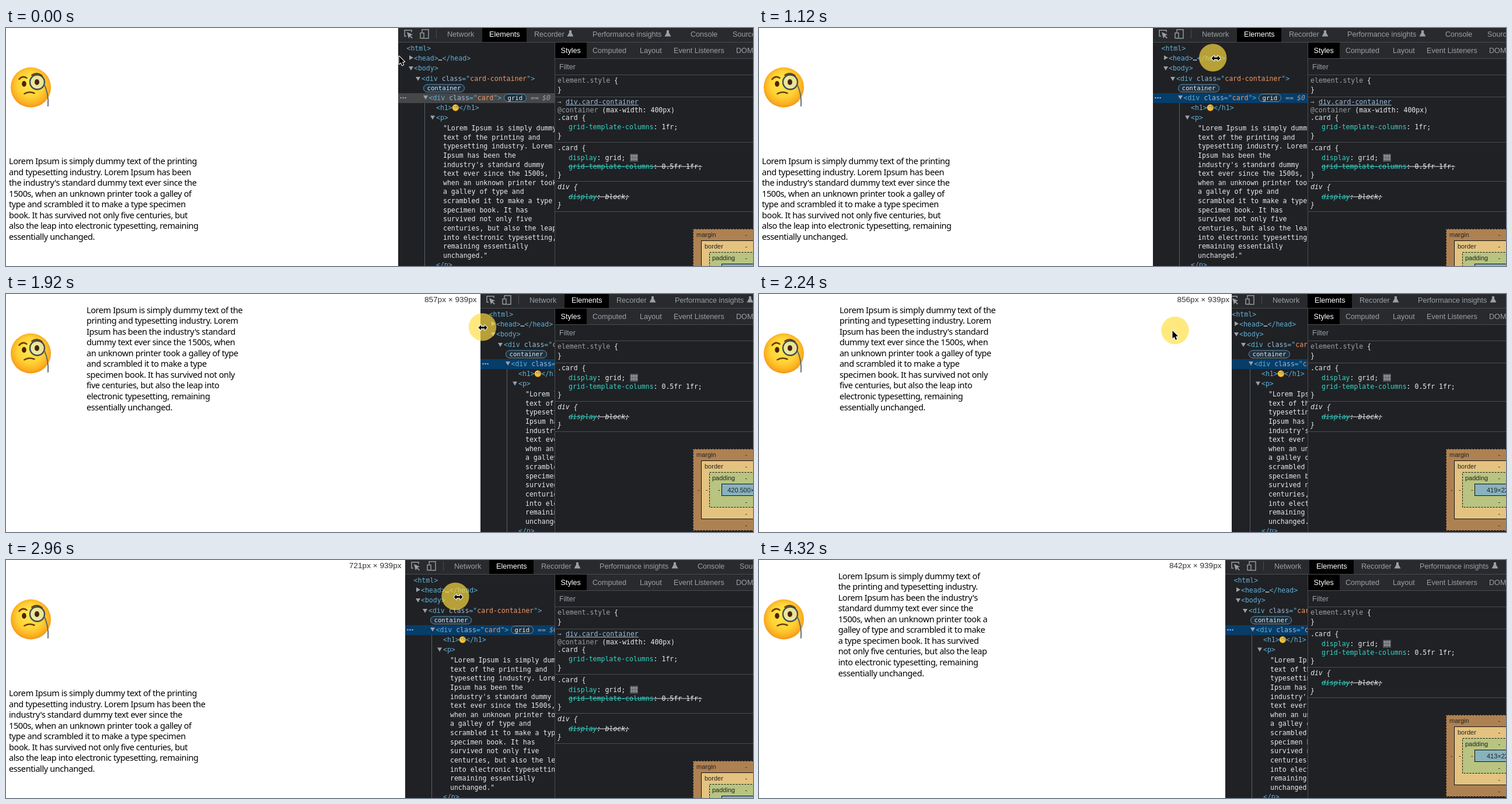
Recreate the animation shown at these times as an HTML page with a canvas. Size 1280 px wide and 409 px high, loop 4.48 s.

```html
<!DOCTYPE html>
<html lang="en">
<head>
<meta charset="utf-8">
<title>Container query demo</title>
<style>
  html, body { margin: 0; width: 100%; height: 100%; overflow: hidden; background: #fff; }
  canvas { display: block; width: 1280px; height: 409px; }
</style>
</head>
<body>
<canvas id="stage" width="1280" height="409"></canvas>
<script>
const ctx = document.getElementById('stage').getContext('2d');
const LOOP = 4480, STEP = 80, ZOOM = 0.949, SPLIT = 940, BREAK = 774;

const SANS = '"Liberation Sans", Arial, sans-serif';
const UI = '12.6px ' + SANS;
const CODE = '11.52px "DejaVu Sans Mono", monospace';
const SLANT = 'italic ' + CODE;
const BADGE = '10.7px "DejaVu Sans Mono", monospace';
const PAGE = '14.5px "Noto Sans", sans-serif';

const C = {
  bg: '#202124', bar: '#292a2d', line: '#494c50', gray: '#9aa0a6', light: '#e8eaed',
  tag: '#5db0d7', attr: '#9bbbdc', value: '#f29766', prop: '#35d4c7'
};

const words = ('Lorem Ipsum is simply dummy text of the printing and typesetting industry. ' +
  "Lorem Ipsum has been the industry's standard dummy text ever since the 1500s, when an " +
  'unknown printer took a galley of type and scrambled it to make a type specimen book. ' +
  'It has survived not only five centuries, but also the leap into electronic typesetting, ' +
  'remaining essentially unchanged.').split(' ');

// Words per line, by the smallest page width at which the wrapping applies.
const wraps = [
  [806, [8, 5, 6, 7, 8, 7, 7, 7, 3, 2]],
  [BREAK, [7, 5, 6, 6, 7, 8, 7, 8, 4, 2]],
  [714, [10, 7, 8, 10, 10, 9, 5, 1]],
  [680, [9, 8, 7, 9, 9, 9, 7, 2]],
  [0, [9, 7, 8, 9, 9, 9, 7, 2]]
];
const treeWrap = [5, 5, 3, 4, 3, 5, 5, 5, 6, 4, 4, 5, 3, 2, 1];

// Page width and pointer position as [time, value] keys.
const pageKeys = [[0, 672], [1040, 672], [1120, 675], [1200, 695], [1280, 730], [1360, 762],
  [1440, 782], [1520, 794], [1600, 802], [1760, 811], [2000, 814], [2160, 813.5], [2240, 812.5],
  [2320, 790], [2400, 745], [2480, 705], [2560, 681], [2880, 681], [2960, 684], [3040, 705],
  [3120, 735], [3200, 762], [3280, 779], [3360, 786.7], [3440, 789], [3840, 789], [4320, 799]];
const mouseX = [[0, 673], [160, 674], [240, 675], [880, 675], [960, 690], [1040, 735], [1120, 783],
  [1200, 806], [1280, 814], [1600, 817], [1920, 817], [2000, 814], [2080, 800], [2160, 762],
  [2240, 708], [2320, 690], [2400, 685], [2560, 684], [2720, 684], [2800, 690], [2880, 730],
  [2960, 775], [3040, 795], [3120, 801], [3360, 802]];
const mouseY = [[0, 48], [80, 48], [160, 53], [240, 51], [1680, 51], [2160, 62.5]];

function at(keys, t) {
  let i = 1;
  while (i < keys.length && keys[i][0] <= t) i++;
  const [t0, a] = keys[i - 1];
  if (i === keys.length) return a;
  const [t1, b] = keys[i];
  return a + (b - a) * (t - t0) / (t1 - t0);
}

function lines(counts) {
  let i = 0;
  return counts.map(n => words.slice(i, i += n).join(' '));
}

function rect(x, y, w, h, color) {
  ctx.fillStyle = color;
  ctx.fillRect(x, y, w, h);
}

function text(s, x, y, color, font) {
  ctx.font = font;
  ctx.fillStyle = color;
  ctx.fillText(s, x, y);
  return x + ctx.measureText(s).width;
}

// Draws coloured pieces [string, colour, ...] one after another.
function run(x, yc, parts, font = CODE, strike = false) {
  for (let i = 0; i < parts.length; i += 2) {
    const end = text(parts[i], x, yc + 4, parts[i + 1], font);
    if (strike) rect(x, yc, end - x, 1, parts[i + 1]);
    x = end;
  }
  return x;
}

function shape(points, fill) {
  ctx.beginPath();
  points.forEach(([x, y]) => ctx.lineTo(x, y));
  ctx.closePath();
  if (fill) {
    ctx.fillStyle = fill;
    ctx.fill();
  }
}

function curve(color, width, x0, y0, ...rest) {
  ctx.strokeStyle = color;
  ctx.lineWidth = width;
  ctx.beginPath();
  ctx.moveTo(x0, y0);
  ctx.quadraticCurveTo(...rest);
  ctx.stroke();
}

function ellipse(x, y, rx, ry, color) {
  ctx.fillStyle = color;
  ctx.beginPath();
  ctx.ellipse(x, y, rx, ry, 0, 0, 7);
  ctx.fill();
}

function face(x, y, r) {
  ctx.save();
  ctx.translate(x, y);
  ctx.scale(r / 34.5, r / 34.5);
  ctx.lineCap = 'round';
  const g = ctx.createRadialGradient(-2, -10, 4, 0, -2, 37);
  g.addColorStop(0, '#ffe650');
  g.addColorStop(0.55, '#ffd235');
  g.addColorStop(0.85, '#fbb021');
  g.addColorStop(1, '#f2921b');
  ellipse(0, 0, 34.5, 34.5, g);
  curve('#6b3c0c', 2.6, -20, -14, -14, -21, -7, -16);
  curve('#6b3c0c', 2.6, 2, -21, 10, -27, 19, -20);
  ellipse(-11.5, -6, 3.8, 5, '#4b2508');
  ellipse(11, -9, 12.5, 12.5, 'rgba(226,233,190,.72)');
  ellipse(10.5, -9, 4, 5, '#4b2508');
  ctx.strokeStyle = '#3f4a52';
  ctx.lineWidth = 2.4;
  ctx.beginPath();
  ctx.arc(11, -9, 12.5, 0, 7);
  ctx.stroke();
  curve('#59636b', 1.8, 23, -5, 31, 12, 29.5, 32);
  curve('#6b3c0c', 2.6, -11, 11, -3, 6, 6, 10);
  ctx.restore();
}

function drawPage(width, showSize) {
  const stacked = width < BREAK;
  const counts = wraps.find(w => width >= w[0])[1];
  const x = stacked ? 5 : 5 + (width - 15.2) / 6;
  const y = stacked ? 234 : 32.5;
  face(42.5, 102, 34.5);
  ctx.letterSpacing = '-0.4px';
  lines(counts).forEach((s, i) => text(s, x, y + i * 18.56, '#000', PAGE));
  ctx.letterSpacing = '0px';
  if (showSize) {
    ctx.textAlign = 'right';
    text(Math.round(width / ZOOM) + 'px × 939px', width - 6.5, 13.8, '#333', '13.6px ' + SANS);
    ctx.textAlign = 'left';
  }
}

function flask(x) {
  shape([[x + 3, 4], [x + 7, 4], [x + 7, 8], [x + 10.5, 14.5], [x - 0.5, 14.5], [x + 3, 8]], C.gray);
}

function drawToolbar(x) {
  rect(x, 0, 1280 - x, 24, C.bar);
  rect(x, 24, 1280 - x, 1, C.line);
  ctx.strokeStyle = C.gray;
  ctx.lineWidth = 1.4;
  ctx.beginPath();
  ctx.moveTo(x + 14, 14);
  ctx.lineTo(x + 11, 14);
  ctx.lineTo(x + 11, 3.7);
  ctx.lineTo(x + 23, 3.7);
  ctx.lineTo(x + 23, 7);
  ctx.stroke();
  shape([[x + 15, 7], [x + 25, 11.5], [x + 21, 13], [x + 25, 17], [x + 23.5, 18], [x + 20, 14.5], [x + 18, 18]], C.gray);
  ctx.strokeRect(x + 41, 2.7, 11, 15);
  rect(x + 37, 7.5, 8, 11, C.bar);
  ctx.strokeRect(x + 38, 8.5, 6, 9);
  rect(x + 65, 2, 1, 16, C.line);
  rect(x + 144, 0, 76, 24, '#000');
  [['Network', 84], ['Elements', 156], ['Recorder', 233], ['Performance insights', 333],
    ['Console', 501], ['Sources', 573]].forEach(([s, dx]) =>
    text(s, x + dx, 14.5, s === 'Elements' ? '#fff' : C.gray, UI));
  flask(x + 290);
  flask(x + 457);
}

function arrow(x, y, open) {
  shape(open ? [[x, y - 3], [x + 8, y - 3], [x + 4, y + 4]]
    : [[x, y - 4], [x + 7, y], [x, y + 4]], C.gray);
}

function badge(s, x, y, w) {
  ctx.beginPath();
  ctx.roundRect(x + 0.5, y - 6.5, w, 13, 6.5);
  ctx.fillStyle = '#1e3140';
  ctx.fill();
  ctx.strokeStyle = '#6694b0';
  ctx.lineWidth = 1;
  ctx.stroke();
  text(s, x + 6.5, y + 3.5, C.light, BADGE);
}

function openDiv(x, y, name) {
  run(x, y, ['<div ', C.tag, 'class', C.attr, '="', C.tag, name, C.value, '">', C.tag]);
}

function drawTree(x, focused) {
  rect(x, 25, SPLIT - x, 384, C.bg);
  rect(x, 112, SPLIT - x, 17, focused ? '#073d69' : '#454748');
  rect(x + 45, 129, 1, 280, '#56616b');

  run(x + 14.5, 35, ['<html>', C.tag]);
  arrow(x + 19, 51, false);
  run(x + 27, 51.5, ['<head>', C.tag, '…', C.light, '</head>', C.tag]);
  arrow(x + 18, 69, true);
  run(x + 27, 69, ['<body>', C.tag]);
  arrow(x + 30, 87, true);
  openDiv(x + 40, 87, 'card-container');
  badge('container', x + 43, 103.5, 70);

  for (let i = 0; i < 3; i++) ellipse(x + 4.5 + i * 4, 120, 1.3, 1.3, focused ? '#8ab4f8' : C.gray);
  arrow(x + 43, 119, true);
  openDiv(x + 52.5, 119.5, 'card');
  badge('grid', x + 181, 120, 38);
  run(x + 227, 119.5, ['== ', C.gray]);
  run(x + 247, 119.5, ['$0', C.gray], SLANT);

  run(x + 65, 137, ['<h1>', C.tag]);
  face(x + 98.3, 137, 5.7);
  run(x + 104, 137, ['</h1>', C.tag]);
  arrow(x + 55, 153.5, true);
  run(x + 65, 154, ['<p>', C.tag]);
  const para = lines(treeWrap);
  para.forEach((s, i) => {
    const full = (i ? '' : '"') + s + (i === para.length - 1 ? '"' : '');
    run(x + 77, 172 + i * 15.64, [full, C.light]);
  });
  run(x + 65, 407, ['</p>', C.tag]);
}

function rule(y) {
  rect(SPLIT + 1, y, 340, 1, C.line);
}

function decl(y, name, value, font = CODE, strike = false) {
  run(964, y, [name, C.prop, ': ' + value + ';', C.light], font, strike);
}

function gridIcon(y) {
  rect(1069, y, 14, 14, '#484b4f');
  for (let i = 0; i < 6; i++) {
    ctx.strokeStyle = '#b4b9be';
    ctx.lineWidth = 0.9;
    ctx.strokeRect(1071.2 + (i % 3) * 4, y + 2.5 + (i > 2) * 5.2, 2, 3.2);
  }
}

function box(x, y, h, fill, dashed) {
  rect(x, y, 1280 - x, h, fill);
  ctx.strokeStyle = '#111';
  ctx.lineWidth = 1;
  ctx.setLineDash(dashed ? [3, 2] : []);
  ctx.strokeRect(x + 0.5, y + 0.5, 200, h - 1);
  ctx.setLineDash([]);
}

function drawBoxModel(y, width) {
  const font = '11px ' + SANS, ink = '#222';
  box(1177, y, 141, '#ae8152', true);
  box(1191, y + 20, 101, '#e4c381', false);
  box(1205, y + 40, 61, '#b8c480', true);
  box(1226, y + 60, 21, '#88b2bd', false);
  [['margin', 1183, 1185], ['border', 1197, 1199], ['padding', 1210, 1220]].forEach(([s, x, left], i) => {
    text(s, x, y + 14 + i * 20, ink, font);
    text('-', 1266.5, y + 13.5 + i * 20, ink, font);
    text('-', 1266.5, y + 134.5 - i * 20, ink, font);
    text('-', left, y + 74, ink, font);
  });
  const half = (Math.round(width / ZOOM) - 16) / 2;
  const size = Number.isInteger(half) ? half : half.toFixed(3);
  ctx.textAlign = 'center';
  text(size + '×222', 1268.5, y + 74.5, ink, font);
  ctx.textAlign = 'left';
}

function drawStyles(stacked, width) {
  rect(SPLIT, 25, 340, 384, C.bg);
  rect(SPLIT, 25, 340, 27, C.bar);
  rect(SPLIT, 25, 1, 384, C.line);
  rect(SPLIT + 1, 25, 54, 27, '#000');
  [['Styles', 950.5], ['Computed', 1005], ['Layout', 1086], ['Event Listeners', 1144],
    ['DOM Breakpoints', 1251]].forEach(([s, x], i) => text(s, x, 42.5, i ? C.gray : '#fff', UI));
  rule(52);
  text('Filter', 948, 70.5, C.gray, UI);
  rule(80);
  run(945, 90, ['element.style', C.gray, ' {', C.light]);
  run(945, 106, ['}', C.light]);
  rule(118);
  let y = 127;
  if (stacked) {
    run(945, 127, ['→', C.gray]);
    const end = run(959, 127, ['div.card-container', '#9bbbdc']);
    rect(959, 132, end - 959, 1, '#9bbbdc');
    run(945, 140.5, ['@container ', C.gray, '(max-width: 400px)', C.light]);
    run(945, 154, ['.card {', C.light]);
    decl(170, 'grid-template-columns', '1fr');
    run(945, 185, ['}', C.light]);
    rule(196);
    y = 206;
  }
  run(945, y, ['.card {', C.light]);
  decl(y + 16.5, 'display', 'grid');
  gridIcon(y + 10);
  decl(y + 31.5, 'grid-template-columns', '0.5fr 1fr', CODE, stacked);
  run(945, y + 45.5, ['}', C.light]);
  rule(y + 57);
  run(945, y + 66.5, ['div {', C.light], SLANT);
  decl(y + 83.5, 'display', 'block', SLANT, true);
  run(945, y + 97.5, ['}', C.light], SLANT);
  rule(y + 109);
  drawBoxModel(y + 139, width);
}

function drawPointer(t) {
  if (t >= 3920) return;
  const x = at(mouseX, t), y = at(mouseY, t);
  if (t >= 400 && t < 3680) ellipse(at(mouseX, t - 8) - 0.5, y, 23.7, 23.7, 'rgba(255,222,64,.67)');
  ctx.save();
  ctx.translate(x, y);
  ctx.lineJoin = 'round';
  if (t < 160 || (t >= 2160 && t < 2320)) {
    shape([[0.5, 0.5], [0.5, 14], [3.6, 11.2], [5.8, 16.3], [8.2, 15.2], [6, 10.3], [10, 10]]);
  } else {
    ctx.translate(0, 1);
    shape([[-7.5, 0], [-3, -4.5], [-3, -1.4], [3, -1.4], [3, -4.5], [7.5, 0],
      [3, 4.5], [3, 1.4], [-3, 1.4], [-3, 4.5]]);
  }
  ctx.strokeStyle = '#fff';
  ctx.lineWidth = 2;
  ctx.stroke();
  ctx.fillStyle = '#000';
  ctx.fill();
  ctx.restore();
}

function draw(t) {
  const page = at(pageKeys, t);
  // The inspector relayouts ahead of the page when it grows.
  const panel = Math.min(page, at(pageKeys, t + 58));
  const edge = page * 0.85 + panel * 0.15;
  const x = Math.round(panel);
  rect(0, 0, 1280, 409, '#fff');
  drawPage(page, t >= 1200);
  ctx.save();
  ctx.beginPath();
  ctx.rect(Math.round(edge), 0, 1280, 409);
  ctx.clip();
  drawToolbar(x);
  drawTree(x, t >= 400);
  drawStyles(page < BREAK, edge);
  ctx.restore();
  drawPointer(t);
}

const start = performance.now();
function tick() {
  const t = (performance.now() - start) % LOOP;
  draw(Math.floor(t / STEP) * STEP);
  requestAnimationFrame(tick);
}
tick();
</script>
</body>
</html>
```
